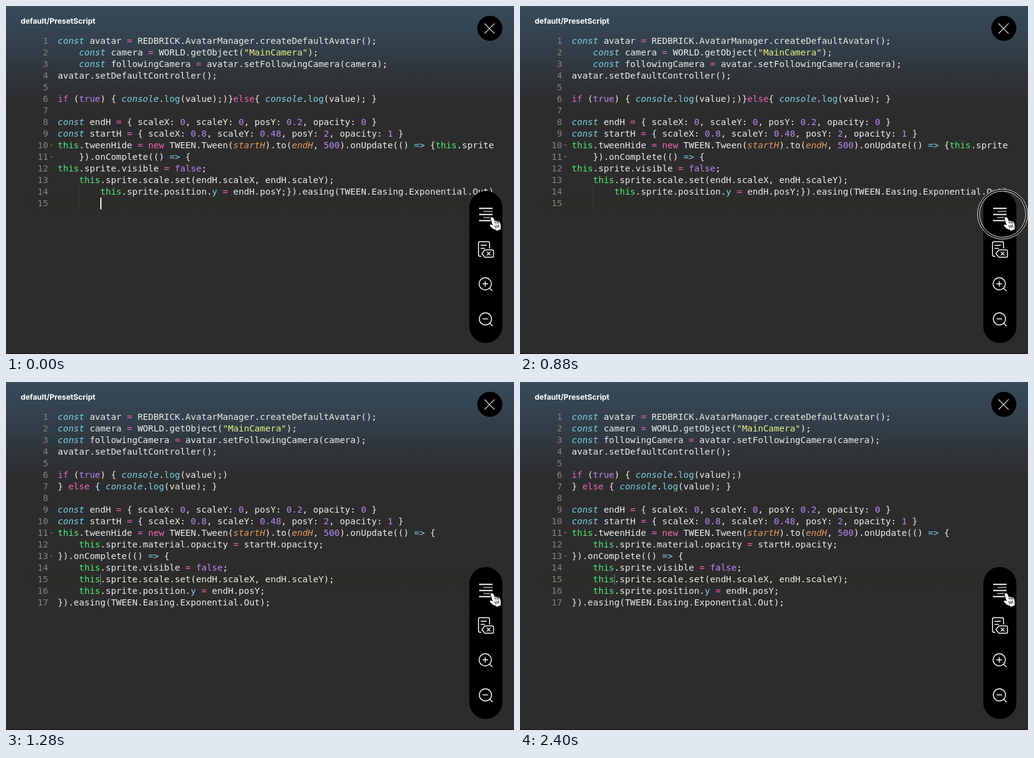
These frames come from a looping animation (830 by 570 pixels, 2480 ms). An HTML page with a canvas:

```html
<!DOCTYPE html>
<html lang="en">
<head>
<meta charset="utf-8">
<title>Code formatting</title>
<style>
html, body { margin: 0; width: 100%; height: 100%; overflow: hidden; background: #2d2b2b; }
canvas { display: block; }
</style>
</head>
<body>
<canvas id="stage" width="830" height="570"></canvas>
<script>
const ctx = document.getElementById('stage').getContext('2d');
const LOOP = 2480, CARET_OFF = 560, PRESS = 880, FORMAT = 1040;
const LEFT = 84.5, TOP = 62, ROW = 19;
const MONO = '14.44px "DejaVu Sans Mono", monospace';

const messy = `const avatar = REDBRICK.AvatarManager.createDefaultAvatar();
    const camera = WORLD.getObject("MainCamera");
    const followingCamera = avatar.setFollowingCamera(camera);
avatar.setDefaultController();

if (true) { console.log(value);)}else{ console.log(value); }

const endH = { scaleX: 0, scaleY: 0, posY: 0.2, opacity: 0 }
const startH = { scaleX: 0.8, scaleY: 0.48, posY: 2, opacity: 1 }
this.tweenHide = new TWEEN.Tween(startH).to(endH, 500).onUpdate(() => {this.sprite
    }).onComplete(() => {
this.sprite.visible = false;
    this.sprite.scale.set(endH.scaleX, endH.scaleY);
        this.sprite.position.y = endH.posY;}).easing(TWEEN.Easing.Exponential.Out)
`.split('\n');

const tidy = `const avatar = REDBRICK.AvatarManager.createDefaultAvatar();
const camera = WORLD.getObject("MainCamera");
const followingCamera = avatar.setFollowingCamera(camera);
avatar.setDefaultController();

if (true) { console.log(value);)
} else { console.log(value); }

const endH = { scaleX: 0, scaleY: 0, posY: 0.2, opacity: 0 }
const startH = { scaleX: 0.8, scaleY: 0.48, posY: 2, opacity: 1 }
this.tweenHide = new TWEEN.Tween(startH).to(endH, 500).onUpdate(() => {
    this.sprite.material.opacity = startH.opacity;
}).onComplete(() => {
    this.sprite.visible = false;
    this.sprite.scale.set(endH.scaleX, endH.scaleY);
    this.sprite.position.y = endH.posY;
}).easing(TWEEN.Easing.Exponential.Out);`.split('\n');

// [pattern, colour, italic], first match wins
const rules = [
  ['"[^"]*"', '#e9f08a'],
  ['=>|\\b(?:const|console)\\b', '#78d3e8', true],
  ['\\blog\\b|(?<=\\.)y\\b', '#78d3e8'],
  ['=|\\b(?:if|else|new)\\b', '#ee69b2'],
  ['\\bthis\\b', '#50ec78'],
  ['\\b(?:true|false|\\d[\\d.]*)\\b', '#b48cf0'],
  ['\\bstartH(?=\\))|\\bendH(?=,)', '#e39a5c', true]
];
const lexer = new RegExp(rules.map(r => `(${r[0]})`).join('|'), 'g');

function tokens(line) {
  const list = [];
  let end = 0;
  const plain = to => { if (to > end) list.push([end, line.slice(end, to), '#edede9']); };
  for (const m of line.matchAll(lexer)) {
    const [, color, italic] = rules[m.slice(1).findIndex(g => g !== undefined)];
    plain(m.index);
    list.push([m.index, m[0], color, italic]);
    end = m.index + m[0].length;
  }
  plain(line.length);
  return list;
}

const views = [
  { lines: messy.map(tokens), folds: [10, 11] },
  { lines: tidy.map(tokens), folds: [11, 13] }
];

function box(x, y, w, h, color) {
  ctx.fillStyle = color;
  ctx.fillRect(x, y, w, h);
}

function stroke(path, color = '#fff', width = 1.5) {
  ctx.strokeStyle = color;
  ctx.lineWidth = width;
  ctx.stroke(new Path2D(path));
}

function circle(x, y, r) {
  ctx.beginPath();
  ctx.arc(x, y, r, 0, Math.PI * 2);
}

function drawBackground() {
  const g = ctx.createLinearGradient(0, 0, 0, 570);
  g.addColorStop(0, '#374b5b');
  g.addColorStop(0.1, '#33414c');
  g.addColorStop(0.2, '#2f3438');
  g.addColorStop(0.29, '#2d2c2d');
  g.addColorStop(1, '#2d2b2b');
  box(0, 0, 830, 570, g);
  box(0, 569, 830, 1, '#111');
  ctx.fillStyle = '#fff';
  ctx.font = '700 12.3px Inter, sans-serif';
  ctx.textAlign = 'left';
  ctx.fillText('default/PresetScript', 24, 28.5);
}

function drawCode({ lines, folds }) {
  box(35, 314, 765, ROW, '#2a2c27');
  ctx.font = MONO;
  const charWidth = ctx.measureText('0').width;
  lines.forEach((line, i) => {
    const y = TOP + i * ROW;
    ctx.font = MONO;
    ctx.textAlign = 'right';
    ctx.fillStyle = '#808385';
    ctx.fillText(i + 1, 69, y);
    if (folds.includes(i + 1)) {
      ctx.fillStyle = '#6c6c6c';
      ctx.fill(new Path2D(`M72 ${y - 6}h4.5l-2.25 2.5z`));
    }
    ctx.textAlign = 'left';
    for (const [col, text, color, italic] of line) {
      ctx.font = (italic ? 'italic ' : '') + MONO;
      ctx.fillStyle = color;
      ctx.fillText(text, LEFT + col * charWidth, y);
    }
  });
}

function drawLens(x, y, plus) {
  circle(x, y, 10);
  ctx.strokeStyle = '#fff';
  ctx.lineWidth = 1.4;
  ctx.stroke();
  stroke(`M${x + 7.2} ${y + 7.2}l4 4M${x - 4} ${y}h8` + (plus ? `M${x} ${y - 4}v8` : ''), '#fff', 1.4);
}

function drawControls() {
  ctx.lineCap = ctx.lineJoin = 'round';
  ctx.fillStyle = '#000';
  circle(790.5, 36.5, 20.5);
  ctx.fill();
  stroke('M782 28.8l16 16m0-16l-16 16', '#f0f0f0', 1.2);

  ctx.beginPath();
  ctx.roundRect(757, 303, 54, 249, 27);
  ctx.fill();
  ctx.lineCap = 'butt';
  stroke('M773 331.5h22M773 341.5h22M773 351.5h22', '#fff', 2);
  stroke('M780 336.5h15M780 346.5h15', '#9a959c', 2);

  ctx.lineCap = 'round';
  stroke('M776 410h-1.5q-2.5 0-2.5-2.5v-19q0-2.5 2.5-2.5h13q2.5 0 2.5 2.5v8M776 392h9M776 397h6');
  stroke('M777.5 405.5l5-6h12q2 0 2 2v8q0 2-2 2h-12zM786 403l5 5m0-5l-5 5', '#fff', 1.4);
  drawLens(783, 455, true);
  drawLens(783.3, 512.5, false);
  ctx.lineCap = 'butt';
}

function drawHand() {
  ctx.save();
  ctx.translate(790, 344.3);
  ctx.scale(1.15, 1.15);
  const hand = 'M2.8 1.7c1.3-.6 2.4 0 2.9 1.1l1.9 4.4c.5-1 2-1 2.5.2.6-.8 2-.6 2.4.5.9-.5 2 0 2.3 1' +
    ' .9 2.6 1.7 5 .8 7.3l.7 2.3-6.1 2.3-1-1.7c-2.2.1-4-.9-5.6-2.4L.9 14c-.9-1 .2-2.6 1.6-2' +
    'l2.1 1L1.6 4.1c-.4-1 .2-2 1.2-2.4z';
  ctx.fillStyle = '#fff';
  stroke(hand, '#000', 1.8);
  ctx.fill(new Path2D(hand));
  stroke('M7.6 7.5l1.1 2.9M10.1 7.6l1.1 2.9M12.5 8l.9 2.5M7.6 13l1.4 4M10 12.5l1.4 4M12.2 12l1.2 3.5', '#000', 0.9);
  ctx.restore();
}

function drawPressRing() {
  for (const [r, width, color] of [[39.5, 4, '#151515'], [41, 1, '#e4e4e4'], [37.8, 1, '#e4e4e4']]) {
    circle(788.5, 341, r);
    ctx.lineWidth = width;
    ctx.strokeStyle = color;
    ctx.stroke();
  }
}

function draw(t) {
  const formatted = t >= FORMAT;
  drawBackground();
  drawCode(views[formatted ? 1 : 0]);
  if (formatted) {
    box(154, 315, 1, 17, '#8b8b88');
  } else {
    box(119, 295, 1, 38, '#3a3a38');
    if (t < CARET_OFF) box(154, 314, 2, 19, '#f4f4f0');
  }
  drawControls();
  if (t >= PRESS && !formatted) drawPressRing();
  drawHand();
}

function tick() {
  draw(performance.now() % LOOP);
  requestAnimationFrame(tick);
}
tick();
</script>
</body>
</html>
```
